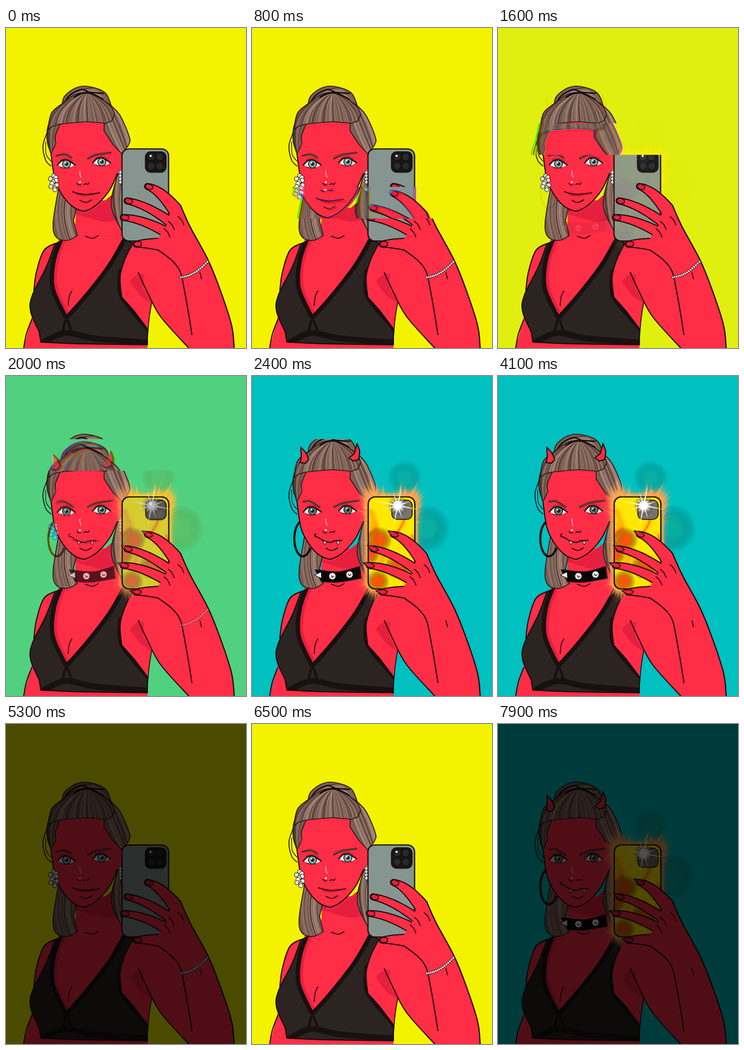
Write an HTML page with a canvas that moves like this. It is 448 px wide and 598 px high and loops after 8 s.

```html
<!DOCTYPE html>
<html lang="en">
<head>
<meta charset="utf-8">
<title>Selfie</title>
<style>
html, body { margin: 0; width: 100%; height: 100%; overflow: hidden; background: #000; }
canvas { display: block; width: 448px; height: 598px; }
</style>
</head>
<body>
<canvas id="stage" width="448" height="598"></canvas>
<script>
const W = 448, H = 598, LOOP = 8000;
const INK = '#160b0c', SKIN = '#ff2d46', SHADE = '#e61f3e', NAIL = '#e9203c';
const NECK_LEFT = '105,397 92,435 90,485 113,537';
const NECK_RIGHT = '113,537 146,500 190,443 219,393';
const FOREARM = '326,332 344,372 377,433 400,490 421,555 426,598';
const JAW = '84,235 91,282 103,309 121,331 139,341 151,341 172,328 194,302 208,272';

const clamp = v => Math.max(0, Math.min(1, v));
const lerp = (a, b, k) => a + (b - a) * k;

function layer() {
  const c = document.createElement('canvas');
  c.width = W;
  c.height = H;
  return c.getContext('2d');
}

function randomizer(seed) {
  return () => (seed = (seed * 16807) % 2147483647) / 2147483647;
}

// Smooth curve through points; "/" starts a new run with a corner.
function spline(text) {
  let d = '';
  for (const run of text.split('/')) {
    const p = run.trim().split(/\s+/).map(q => q.split(',').map(Number));
    d += (d ? 'L' : 'M') + p[0];
    for (let i = 0; i < p.length - 1; i++) {
      const b = p[i], c = p[i + 1], a = p[i - 1] || b, e = p[i + 2] || c;
      d += 'C' + [b[0] + (c[0] - a[0]) / 6, b[1] + (c[1] - a[1]) / 6,
        c[0] - (e[0] - b[0]) / 6, c[1] - (e[1] - b[1]) / 6, c[0], c[1]].join(' ');
    }
  }
  return new Path2D(d);
}

function closed(text) {
  const path = spline(text);
  path.closePath();
  return path;
}

function paint(g, path, color, width = 0, ink = INK) {
  g.fillStyle = color;
  g.fill(path);
  if (!width) return;
  g.lineWidth = width;
  g.strokeStyle = ink;
  g.stroke(path);
}

function shape(g, text, color, width, ink) {
  paint(g, closed(text), color, width, ink);
}

function line(g, text, width = 2, color = INK) {
  g.lineWidth = width;
  g.strokeStyle = color;
  g.stroke(spline(text));
}

function dot(g, x, y, r, color, edge = 0) {
  const path = new Path2D();
  path.arc(x, y, r, 0, Math.PI * 2);
  paint(g, path, color, edge);
}

function box(g, x, y, w, h, r, color, edge) {
  const path = new Path2D();
  path.roundRect(x, y, w, h, r);
  paint(g, path, color, edge);
  return path;
}

function glow(g, x, y, r, color) {
  const grad = g.createRadialGradient(x, y, 0, x, y, r);
  grad.addColorStop(0, color);
  grad.addColorStop(0.35, color);
  grad.addColorStop(1, 'transparent');
  g.fillStyle = grad;
  g.fillRect(x - r, y - r, 2 * r, 2 * r);
}

function clipped(g, path, draw) {
  g.save();
  g.clip(path);
  draw();
  g.restore();
}

// Hair whose strands blend from one guide curve [x0,y0, cx,cy, x1,y1] to another.
function lock(g, outline, from, to, n, seed) {
  const rnd = randomizer(seed), path = closed(outline);
  const tones = ['#a98a7c', '#5a4138', '#8f7164', '#3f2b26', '#b7988a'];
  paint(g, path, '#7d6156');
  clipped(g, path, () => {
    for (let i = 0; i <= n; i++) {
      const k = (i + rnd() * 0.6) / n;
      const p = from.map((v, j) => lerp(v, to[j], k));
      g.beginPath();
      g.moveTo(p[0], p[1]);
      g.quadraticCurveTo(p[2], p[3], p[4], p[5]);
      g.lineWidth = 1 + rnd() * 2.6;
      g.globalAlpha = 0.45 + rnd() * 0.4;
      g.strokeStyle = tones[Math.floor(rnd() * tones.length)];
      g.stroke();
    }
  });
  g.lineWidth = 1.7;
  g.strokeStyle = '#2a1a18';
  g.stroke(path);
}

function torso(g) {
  shape(g, `131,325 129,370 124,394 / 103,399 72,414 55,470 52,520 46,548 33,598 / 264,598 / 265,560 272,511 /
    289,540 341,598 / ${FOREARM.split(' ').reverse().join(' ')} / 214,320`, SKIN);
  shape(g, '131,336 145,346 172,332 212,300 / 215,354 185,362 131,348', SHADE);
  line(g, '103,399 72,414 57,455 52,490');
  line(g, '48,545 38,572 33,598');
  line(g, '148,389 161,393 172,388', 1.6);
  shape(g, '231,474 243,462 258,460 / 256,487 271,513 250,500', SHADE);
  line(g, '247,457 264,494 289,540 341,598');
  line(g, '272,512 267,545 264,580', 1.6);
  line(g, NECK_LEFT, 13, SHADE);
  line(g, '123,491 118,502 116,519', 1.6);
}

function bra(g) {
  const path = closed(`91,404 / ${NECK_LEFT} / ${NECK_RIGHT} / 237,402 222,432 213,465 216,503 / 240,530 264,562 /
    264,592 130,590 65,587 / 62,568 46,530 49,500 75,447 91,404`);
  paint(g, path, '#2b2421');
  clipped(g, path, () => {
    line(g, `${NECK_LEFT} / ${NECK_RIGHT}`, 14, '#17110f');
    line(g, '65,590 110,570 165,580 264,588', 11, '#17110f');
    line(g, '104,574 113,545 124,574', 5, '#17110f');
    line(g, '213,455 216,503 264,562', 7, '#17110f');
  });
  g.lineWidth = 2;
  g.strokeStyle = INK;
  g.stroke(path);
}

function face(g) {
  lock(g, '209,272 197,318 200,346 217,380 / 219,272', [206, 272, 191, 325, 215, 382], [219, 285, 211, 320, 219, 370], 8, 21);
  lock(g, '98,300 88,363 93,390 114,397 133,388 / 126,360 131,339 / 98,300',
    [95, 298, 82, 350, 98, 398], [128, 325, 119, 350, 136, 390], 15, 8);
  shape(g, `${JAW} / 217,262 / 217,200 / 190,165 / 95,165`, SKIN);
  line(g, JAW);
}

function topHair(g) {
  lock(g, '104,148 109,128 130,112 152,109 185,121 198,150 / 150,136',
    [105, 148, 118, 112, 165, 112], [155, 132, 170, 120, 196, 150], 13, 17);
  line(g, '108,141 120,125 141,115 156,120 182,122', 2.4);
  lock(g, '190,140 212,162 230,203 229,218 216,235 / 200,218 183,192 / 184,165',
    [180, 145, 186, 190, 215, 236], [202, 146, 227, 178, 231, 215], 15, 31);
  lock(g, '88,163 78,185 77,212 84,235 / 93,216 92,202 99,184 / 108,165',
    [82, 160, 69, 195, 82, 236], [112, 165, 91, 190, 91, 230], 12, 7);
  lock(g, '78,190 85,159 104,142 130,124 160,122 194,145 203,162 / 197,174 186,178 / 150,175 105,179 88,183',
    [80, 188, 82, 148, 140, 124], [202, 172, 194, 143, 160, 124], 34, 43);
  line(g, '127,129 142,122 158,122 181,133', 3);
  line(g, '77,195 69,220 74,247 84,258', 1.6);
  line(g, '74,213 75,236 84,249', 1.2);
}

function eye(g, x, y, devil) {
  g.save();
  g.translate(x, y);
  const lid = '-16,2 -8,-6 3,-7 17,2', white = closed(lid + ' / 7,7 -4,7 -16,2');
  paint(g, white, '#eeeceb');
  clipped(g, white, () => {
    dot(g, 1, 0, 7.6, devil ? '#64756e' : '#86aaa3', 1.4);
    dot(g, 1, 0, 3.2, '#1b2020');
    dot(g, -1, -2, 1.5, '#fff');
  });
  line(g, lid, 2.5);
  line(g, '-10,6 -2,8 8,7', 1.1);
  line(g, '-11,-8 0,-11 13,-6', 1, '#96162b');
  g.restore();
}

function features(g, devil) {
  eye(g, 112, devil ? 252 : 254, devil);
  eye(g, 178, 250, devil);
  line(g, devil ? '96,235 108,234 126,245' : '94,239 109,236 122,242', 4, '#60352a');
  line(g, devil ? '153,245 171,237 199,233' : '153,244 168,237 195,233', 4, '#60352a');
  line(g, '138,267 138,273 140,279', 1.5, '#ffc0bd');
  dot(g, 138, 288, 1.7, '#fff');
  line(g, '132,290 135,293 140,293', 1.4);
  line(g, '145,293 148,291 153,292 155,289', 1.5);
  if (devil) {
    line(g, '119,295 117,299 124,302 134,308 146,311 154,308 168,307', 2);
    for (const x of [136, 161]) shape(g, `${x - 3},309 / ${x + 3},309 / ${x},315`, '#fff', 1);
  } else {
    line(g, '133,311 146,313 168,310', 3, '#cf1434');
    line(g, '124,306 134,309 147,311 160,310 175,308', 1.9);
  }
  line(g, '138,322 149,326 160,321', 1.6);
}

function devilWear(g) {
  shape(g, '91,133 100,143 106,156 / 100,163 90,162 / 92,151 91,133', '#f52e43', 2);
  shape(g, '196,126 201,141 199,156 / 189,159 181,153 / 191,145 196,126', '#f52e43', 2);
  g.beginPath();
  g.ellipse(95, 304, 16, 33, 0, 0.6, 4.3);
  g.lineWidth = 4;
  g.strokeStyle = INK;
  g.stroke();
  shape(g, '118,362 162,366 201,356 / 204,378 162,385 130,384', '#080607', 1.6);
  shape(g, '117,372 / 129,366 / 130,378', '#f2eeea', 1);
  for (const [x, y] of [[150, 374], [182, 371]]) {
    dot(g, x, y, 6.5, '#f4f0ec', 1);
    line(g, `${x - 2},${y - 1} ${x},${y + 2} ${x + 3},${y}`, 1.4);
  }
}

// Curled wisps leave the phone's outline, longest above and below.
function flames(g) {
  const rnd = randomizer(77);
  glow(g, 325, 285, 45, 'rgba(20,150,125,.45)');
  glow(g, 285, 190, 32, 'rgba(20,150,125,.4)');
  g.save();
  g.shadowColor = '#ff9a45';
  g.shadowBlur = 10;
  box(g, 210, 219, 100, 183, 18, 'rgba(255,170,90,.6)', 0);
  for (let i = 0; i < 110; i++) {
    const a = i / 110 * Math.PI * 2, c = Math.cos(a), s = Math.sin(a);
    const x = 260 + 46 * Math.sign(c) * Math.abs(c) ** 0.3;
    const y = 312 + 88 * Math.sign(s) * Math.abs(s) ** 0.3;
    if (y > 320 && x > 250) continue;
    const len = 9 + rnd() * lerp(10, 29, s * s), sway = (rnd() - 0.5) * 26;
    const dx = c * len, dy = s * len - 4;
    g.beginPath();
    g.moveTo(x - 5, y);
    g.quadraticCurveTo(x + dx * 0.5 + sway * 0.6, y + dy * 0.5, x + dx + sway * 0.5, y + dy);
    g.quadraticCurveTo(x + dx * 0.6 + sway * 0.2, y + dy * 0.5, x + 5, y);
    g.fillStyle = i % 3 ? 'rgba(255,178,104,.5)' : 'rgba(255,145,50,.45)';
    g.fill();
  }
  g.restore();
}

function plainPhone(g) {
  box(g, 216.5, 226, 87, 172, 13, '#879590', 2.2);
  box(g, 260, 231, 39, 39, 10, '#171718', 1.2);
  for (let i = 0; i < 4; i++) dot(g, 271 + 16 * (i % 2), 241 + 17 * (i >> 1), 7, '#29292b', 1.2);
  dot(g, 270, 239, 2, '#fff');
}

function firePhone(g) {
  const rnd = randomizer(12);
  const body = box(g, 217, 226, 87, 172, 13, '#ffe800', 2.2);
  clipped(g, body, () => {
    g.shadowColor = '#ffa000';
    g.shadowBlur = 8;
    for (let i = 0; i < 12; i++) {
      const x = 218 + rnd() * 84, y = 240 + rnd() * 140, bend = (rnd() - 0.5) * 40;
      line(g, `${x},${y} ${x + bend},${y + 18} ${x + bend * 0.3},${y + 40}`, 2 + rnd() * 6, i % 3 ? '#ffb808' : '#ff8a0a');
    }
    g.shadowBlur = 0;
    for (const [x, y, r] of [[238, 306, 24], [235, 384, 22], [272, 357, 24], [222, 335, 16]]) glow(g, x, y, r, 'rgba(247,62,12,.85)');
  });
  g.lineWidth = 2.2;
  g.strokeStyle = INK;
  g.stroke(body);
  box(g, 261, 232, 38, 36, 10, '#77736b', 1.5);
}

function sparkle(g) {
  glow(g, 272, 242, 19, 'rgba(255,255,240,.9)');
  g.fillStyle = 'rgba(255,255,255,.85)';
  for (let i = 0; i < 12; i++) {
    const a = i * Math.PI / 6 + 0.2, len = [42, 17, 27][i % 3];
    const c = Math.cos(a), s = Math.sin(a);
    g.beginPath();
    g.moveTo(272 + c * len, 242 + s * len);
    g.lineTo(272 - s * 1.8, 242 + c * 1.8);
    g.lineTo(272 + s * 1.8, 242 - c * 1.8);
    g.fill();
  }
}

// Tapered finger along a quadratic bend, with its nail at the tip.
function finger(g, [x0, y0], [cx, cy], [x1, y1], base, devil) {
  const path = new Path2D(), tip = 5.5, n = 12;
  const a0 = Math.atan2(cy - y0, cx - x0);
  const side = (k, sign) => {
    const x = lerp(lerp(x0, cx, k), lerp(cx, x1, k), k), y = lerp(lerp(y0, cy, k), lerp(cy, y1, k), k);
    const a = Math.atan2(lerp(cy - y0, y1 - cy, k), lerp(cx - x0, x1 - cx, k));
    const r = lerp(tip, base, k) * sign;
    path.lineTo(x - Math.sin(a) * r, y + Math.cos(a) * r);
  };
  for (let i = n; i >= 0; i--) side(i / n, 1);
  path.arc(x0, y0, tip, a0 + Math.PI / 2, a0 + Math.PI * 1.5);
  for (let i = 0; i <= n; i++) side(i / n, -1);
  paint(g, path, SKIN, 2);
  g.save();
  g.translate(x0, y0);
  g.rotate(a0 + (devil ? 0.1 : 0));
  shape(g, devil ? '-12,-3 2,-5 10,-1 / 7,3 -1,4 -12,-3' : '-5,0 0,-5 10,-3 / 10,3 2,5 -5,0', NAIL, 1.5);
  g.restore();
}

function hand(g, devil) {
  finger(g, [264, 296], [288, 302], [316, 340], 13, devil);
  finger(g, [226, 323], [264, 330], [310, 365], 9, devil);
  finger(g, [219, 354], [258, 357], [305, 385], 10, devil);
  finger(g, [243, 404], [260, 402], [285, 404], 11, devil);
  shape(g, '326,332 344,372 377,433 / 328,458 308,433 284,415 / 284,393 299,370 305,348', SKIN);
  line(g, FOREARM, 2.2);
  line(g, '284,415 308,433 325,455 333,490 341,535 347,573');
  for (const [x, y] of [[303, 361], [321, 352], [295, 375]]) line(g, `${x},${y} ${x + 7},${y + 7} ${x + 11},${y + 16}`, 1.6);
  line(g, '362,457 365,469', 1.5);
  if (devil) return;
  for (let k = 0; k <= 1; k += 1 / 15) {
    dot(g, 327 + 49 * k, 466 - 29 * k + 6 * Math.sin(k * Math.PI), 2.4, '#f8eee6', 0.9);
  }
}

function portrait(devil) {
  const g = layer();
  g.lineCap = g.lineJoin = 'round';
  g.fillStyle = devil ? '#00c0c0' : '#f3f300';
  g.fillRect(0, 0, W, H);
  torso(g);
  face(g);
  bra(g);
  topHair(g);
  features(g, devil);
  if (devil) {
    devilWear(g);
    flames(g);
    firePhone(g);
  } else {
    for (let i = 0; i < 10; i++) dot(g, 89 + 6 * Math.sin(i * 2.4), 276 + i * 2.9, 4, '#f5f0ec', 1);
    for (let y = 270; y < 292; y += 6) dot(g, 214, y, 3.5, '#f5f0ec', 1);
    plainPhone(g);
  }
  hand(g, devil);
  if (devil) sparkle(g);
  return g.canvas;
}

const stage = document.getElementById('stage').getContext('2d');
const plain = portrait(false), wicked = portrait(true);
const mix = layer(), tint = layer();

// A shifted band climbs the picture with split colour channels.
function glitch(bottom) {
  const top = bottom - 59;
  stage.save();
  stage.beginPath();
  stage.rect(0, top, W, 59);
  stage.clip();
  stage.fillStyle = '#000';
  stage.fillRect(0, top, W, 59);
  ['#f00', '#0f0', '#00f'].forEach((color, i) => {
    tint.globalCompositeOperation = 'copy';
    tint.drawImage(mix.canvas, 0, 0);
    tint.globalCompositeOperation = 'multiply';
    tint.fillStyle = color;
    tint.fillRect(0, 0, W, H);
    stage.globalCompositeOperation = 'lighter';
    stage.drawImage(tint.canvas, (i - 1) * 3 - 4, top < 12 ? 0 : 12 + i * 2, W + 8, H);
  });
  stage.restore();
}

function brightness(t) {
  const fall = s => clamp(1 - (t - s) / 300);
  const rise = s => clamp(lerp(0.31, 1, (t - s) / 300));
  if (t < 4100) return 1;
  if (t < 5300) return fall(4100);
  if (t < 6700) return rise(5300);
  return t < 7900 ? fall(6700) : rise(7900);
}

function draw(now) {
  const t = Math.floor(now % LOOP / 100) * 100;
  const k = clamp((t - 1450) / 900);
  const fade = t >= 7900 ? 1 : t < 5300 ? k * k * (3 - 2 * k) : 0;
  mix.globalAlpha = 1;
  mix.drawImage(plain, 0, 0);
  mix.globalAlpha = fade;
  mix.drawImage(wicked, 0, 0);
  stage.drawImage(mix.canvas, 0, 0);
  const bottom = Math.round(237 - (t - 1600) * 0.149);
  if (t >= 400 && bottom > 0) glitch(bottom);
  stage.fillStyle = `rgba(0,0,0,${1 - brightness(t)})`;
  stage.fillRect(0, 0, W, H);
}

const start = performance.now();
function tick() {
  draw(performance.now() - start);
  requestAnimationFrame(tick);
}
tick();
</script>
</body>
</html>
```
